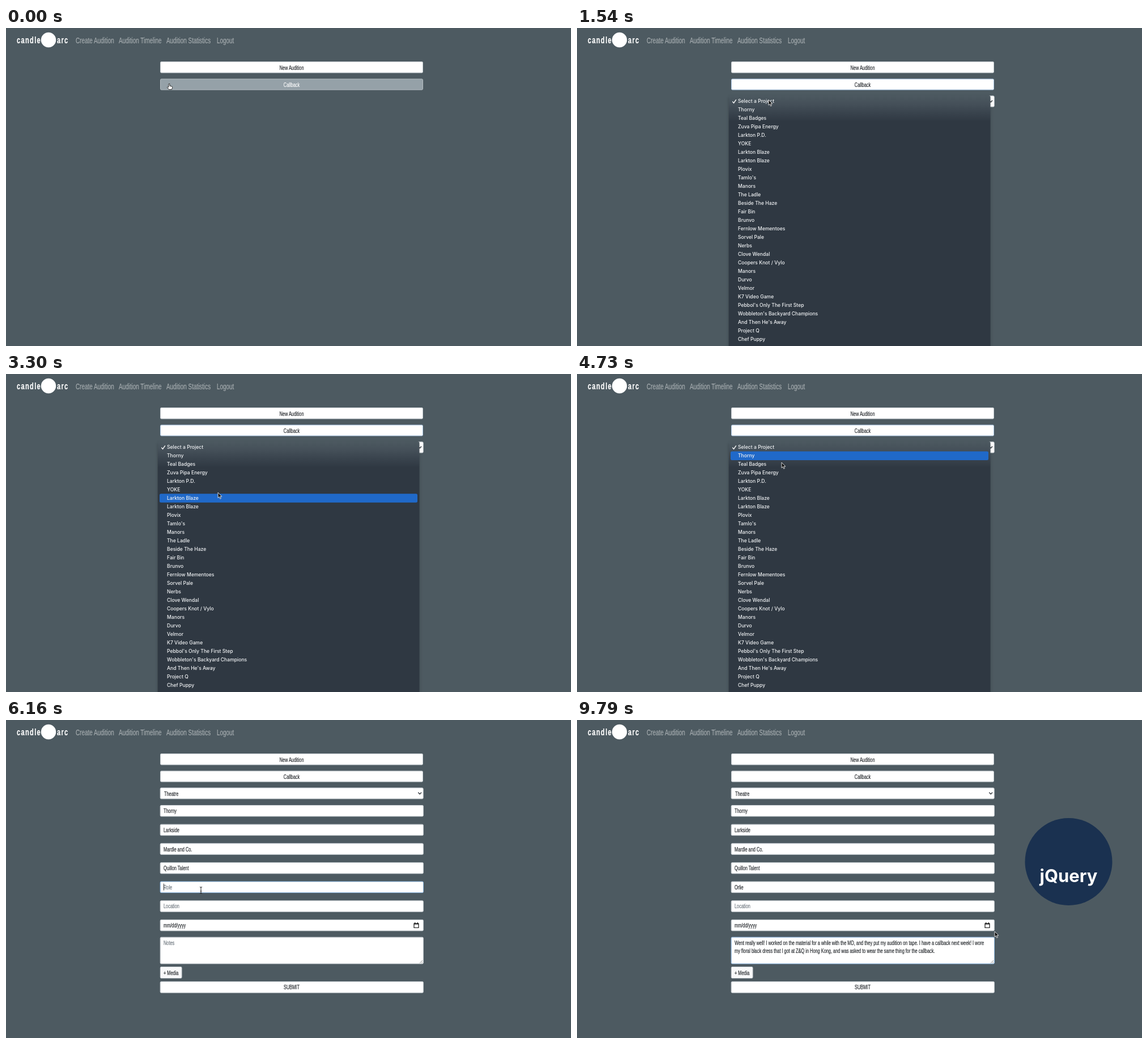
Write an HTML page that moves like this. It is 997 px wide and 561 px high and loops after 9.9 s.

```html
<!DOCTYPE html>
<html lang="en">
<head>
<meta charset="utf-8">
<title>Audition form</title>
<style>
  html, body { margin: 0; width: 100%; height: 100%; overflow: hidden; background: #4d5a61; }
  svg { display: block; width: 100vw; height: 100vh; }
  .narrow { font-family: "Liberation Sans", Arial, sans-serif; stroke-width: .2px; }
  .menu { font: 500 8.6px Inter, Roboto, sans-serif; fill: #f1f3f5; }
  .brand { font-weight: bold; letter-spacing: 2px; }
  .badge { font: 700 31px Inter, Roboto, sans-serif; fill: #fff; text-anchor: middle; }
  text { white-space: pre; }
</style>
</head>
<body>
<svg id="stage" viewBox="0 0 997 561" preserveAspectRatio="none">
  <defs>
    <linearGradient id="panel" gradientUnits="userSpaceOnUse" x1="0" y1="119" x2="0" y2="165">
      <stop offset="0" stop-color="#4c5960"/>
      <stop offset=".35" stop-color="#444f58"/>
      <stop offset=".7" stop-color="#38424c"/>
      <stop offset="1" stop-color="#2f3842"/>
    </linearGradient>
    <filter id="shade" x="-10%" y="-10%" width="120%" height="120%" color-interpolation-filters="sRGB">
      <feDropShadow dx="0" dy="3" stdDeviation="2.5" flood-color="#000" flood-opacity=".2"/>
    </filter>
  </defs>
</svg>
<script>
const LOOP = 9900, STEP = 110, NARROW = .67;
const INK = '#212529', HINT = '#6c757d', EDGE = '#c0c7cc', FOCUS = '#90bce8';
const stage = document.getElementById('stage');

function el(tag, attrs, parent = stage) {
  const node = document.createElementNS(stage.namespaceURI, tag);
  for (const key in attrs) node.setAttribute(key, attrs[key]);
  parent.append(node);
  return node;
}
function paint(node, color) {
  node.setAttribute('fill', color);
  node.setAttribute('stroke', color);
}
function label(x, y, text, parent, size = 11, color = INK, anchor = 'start', cls = '') {
  const node = el('text', {
    class: 'narrow ' + cls, 'font-size': size, 'text-anchor': anchor,
    transform: `translate(${x} ${y}) scale(${NARROW} 1)`
  }, parent);
  paint(node, color);
  node.textContent = text;
  return node;
}
function box(x, y, w, h, parent, fill = '#fff') {
  return el('rect', { x: x + .5, y: y + .5, width: w - 1, height: h - 1, rx: 1.7, fill, stroke: EDGE }, parent);
}
function show(node, on) { node.style.display = on ? '' : 'none'; }

// Header
label(19, 27.3, 'candle', stage, 16.5, '#fff', 'start', 'brand');
el('circle', { cx: 75, cy: 21, r: 13.2, fill: '#fff' });
label(90, 27.3, 'arc', stage, 16.5, '#fff', 'start', 'brand');
[[123, 'Create Audition'], [199, 'Audition Timeline'], [283, 'Audition Statistics'], [372, 'Logout']]
  .forEach(([x, text]) => label(x, 27.3, text, stage, 14.8, '#a6adb0'));

// Mode buttons
box(272, 59, 464, 20.5);
label(504, 74, 'New Audition', stage, 11, INK, 'middle');
const callback = box(272, 89.5, 464, 20);
const callbackText = label(504, 104, 'Callback', stage, 11, INK, 'middle');

// Select
const select = el('g', {});
box(271.7, 119.3, 465, 20.2, select);
const selectText = label(279, 133.7, '', select);
el('path', { d: 'M727.3 127.8l2.9 2.9 2.9-2.9', fill: 'none', stroke: '#343a40', 'stroke-width': 1.5 }, select);

// Form
const form = el('g', {});
const rows = ['Thorny', 'Larkside', 'Mardle and Co.', 'Quillon Talent', 'Role', 'Location', 'mm/dd/yyyy'];
const fields = rows.map((text, i) => {
  const y = 150 + i * 33.65;
  const frame = box(271.7, y, 465.2, 20.5, form);
  return { y, frame, text: label(278, y + 14.2, text, form, 11, i === 4 || i === 5 ? HINT : INK) };
});
const role = fields[4];
el('path', { d: 'M720 359h8v7.5h-8zM720 359.8h8M721.7 357v2M726.3 357v2', fill: 'none', stroke: '#111', 'stroke-width': 1.2 }, form);
const notes = box(271.7, 382.7, 465.2, 47.8, form);
const notesText = [397.2, 410.6].map(y => label(278, y, '', form));
el('path', { d: 'M730 429l5-5M733 429l2-2', stroke: '#777', 'stroke-width': .8 }, form);
box(271.8, 435, 38.8, 21, form, '#f8f9fa');
label(291.2, 449.8, '+ Media', form, 11, INK, 'middle');
box(271.7, 461, 465.2, 20.7, form);
label(504, 475.3, 'SUBMIT', form, 11, INK, 'middle');
const caret = el('rect', { width: .8, height: 12, fill: '#111' }, form);

// Project list
const projects = ['Select a Project', 'Thorny', 'Teal Badges', 'Zuva Pipa Energy', 'Larkton P.D.', 'YOKE',
  'Larkton Blaze', 'Larkton Blaze', 'Plovix', "Tamlo's", 'Manors', 'The Ladle', 'Beside The Haze', 'Fair Bin',
  'Brunvo', 'Fernlow Mementoes', 'Sorvel Pale', 'Nerbs', 'Clove Wendal', 'Coopers Knot / Vylo', 'Manors',
  'Durvo', 'Velmor', 'K7 Video Game', "Pebbol's Only The First Step", "Wobbleton's Backyard Champions",
  "And Then He's Away", 'Project Q', 'Chef Puppy'];
const list = el('g', {});
el('rect', { x: 267.7, y: 119, width: 461.8, height: 460, rx: 3, fill: 'url(#panel)', filter: 'url(#shade)' }, list);
const bar = el('rect', { x: 271, width: 455, height: 15.5, rx: 2.5, fill: '#2069c9' }, list);
el('path', { d: 'M274.3 129.6l2.3 2.8 4.2-6', fill: 'none', stroke: '#fff', 'stroke-width': 1.4 }, list);
projects.forEach((name, i) => {
  el('text', { class: 'menu', x: 284, y: 132.2 + i * 14.98 }, list).textContent = name;
});

// Badge
const badge = el('g', {});
el('circle', { cx: 867.5, cy: 250, r: 77, fill: '#1a3150' }, badge);
el('text', { class: 'badge', x: 867.5, y: 286 }, badge).textContent = 'jQuery';

// Pointers, each with its hot spot at 0,0
const pointers = {
  arrow: el('path', { d: 'M0 0V9.6L2.2 7.6 3.8 11.2 5.4 10.5 3.8 7.1H6.9Z', fill: '#111', stroke: '#fff', 'stroke-width': .8 }),
  hand: el('path', {
    d: 'M-1 .8Q0-.6 1 .8V4.2L5 5.2Q6 5.8 5.5 7.5L4.5 10.5H-.5L-3.6 6.6Q-3.4 5-1 6.4Z',
    fill: '#fff', stroke: '#222', 'stroke-width': .9
  }),
  beam: el('path', { d: 'M-2-5.5Q0-5.5 0-4Q0-5.5 2-5.5M0-4V4.5M-2 6Q0 6 0 4.5Q0 6 2 6M-1.3 2H1.3', fill: 'none', stroke: '#222' })
};

// Pointer path: time, x, y
const path = [[0, 288, 98], [220, 289, 99], [770, 318, 118], [1100, 338, 126], [1870, 338, 127], [2420, 362, 325],
  [2750, 366, 345], [3300, 374, 209], [3850, 364, 142], [4400, 360, 143], [4620, 360, 150], [4730, 361, 156],
  [5060, 362, 146], [5390, 362, 146], [5940, 344, 300], [7920, 344, 300], [8140, 380, 402], [9350, 380, 402], [9790, 737, 373]];

function pointerAt(t) {
  const i = path.findIndex(p => p[0] >= t);
  if (i < 1) return path[i < 0 ? path.length - 1 : 0].slice(1);
  const [t0, x0, y0] = path[i - 1], [t1, x1, y1] = path[i];
  const u = (t - t0) / (t1 - t0), k = u * u * (3 - 2 * u);
  return [x0 + (x1 - x0) * k, y0 + (y1 - y0) * k];
}

const MEMO = ['Went really well! I worked on the material for a while with the MD, and they put my audition on tape. I have a callback next week! I wore',
  'my floral black dress that I got at Z&Q in Hong Kong, and was asked to wear the same thing for the callback.'];
const NAME = 'Orlie';
const typed = (t, from, to, n) => Math.round(Math.min(1, Math.max(0, (t - from) / (to - from))) * n);
const within = (t, a, b) => t >= a && t < b;

function setCaret(node, y, empty, on) {
  show(caret, on);
  caret.setAttribute('x', 278 + (empty ? 0 : node.getComputedTextLength() * NARROW));
  caret.setAttribute('y', y);
}

function draw(t) {
  const [x, y] = pointerAt(t);
  const open = within(t, 1430, 5170), filled = t >= 5280;

  const hover = t < 1430 && y < 109.5;
  callback.setAttribute('fill', hover ? '#95a1a8' : '#fff');
  callback.setAttribute('stroke', hover ? '#b4bdc2' : within(t, 220, 5280) ? '#a9c5e2' : EDGE);
  paint(callbackText, hover ? '#fff' : INK);

  show(select, t >= 440);
  selectText.textContent = filled ? 'Theatre' : 'Select a Project';
  show(list, open);
  const row = Math.floor((pointerAt(t - STEP)[1] - 121.5) / 15);
  show(bar, t > 1870 && row >= 0);
  bar.setAttribute('y', 121.4 + row * 14.98);

  // Typed fields
  show(form, filled);
  const inRole = within(t, 6050, 8140), inNotes = t >= 8140;
  const name = NAME.slice(0, typed(t, 6490, 7480, NAME.length));
  role.text.textContent = name || 'Role';
  paint(role.text, name ? INK : HINT);
  role.frame.setAttribute('stroke', inRole ? FOCUS : EDGE);

  const split = MEMO[0].length, total = split + MEMO[1].length;
  const count = typed(t, 8140, 9350, total);
  notesText[0].textContent = MEMO[0].slice(0, count) || 'Notes';
  notesText[1].textContent = MEMO[1].slice(0, Math.max(0, count - split));
  paint(notesText[0], count ? INK : HINT);
  notes.setAttribute('stroke', inNotes ? FOCUS : EDGE);

  const line = count > split ? 1 : 0;
  if (inNotes) setCaret(notesText[line], 387 + line * 13.4, !count, count < total);
  else setCaret(role.text, role.y + 4, !name, inRole);

  badge.style.opacity = Math.min(1, Math.max(0, (t - 8250) / 440));

  const typing = within(t, 6490, 7920) || within(t, 8250, 9350);
  const overField = x < 736 && (fields.some(f => y >= f.y && y <= f.y + 20) || within(y, 383, 430));
  const kind = hover ? 'hand' : filled && overField ? 'beam' : 'arrow';
  for (const key in pointers) {
    show(pointers[key], key === kind && !typing);
    pointers[key].setAttribute('transform', `translate(${x} ${y})`);
  }
}

function tick() {
  draw(Math.floor(performance.now() % LOOP / STEP) * STEP);
  requestAnimationFrame(tick);
}
tick();
</script>
</body>
</html>
```
